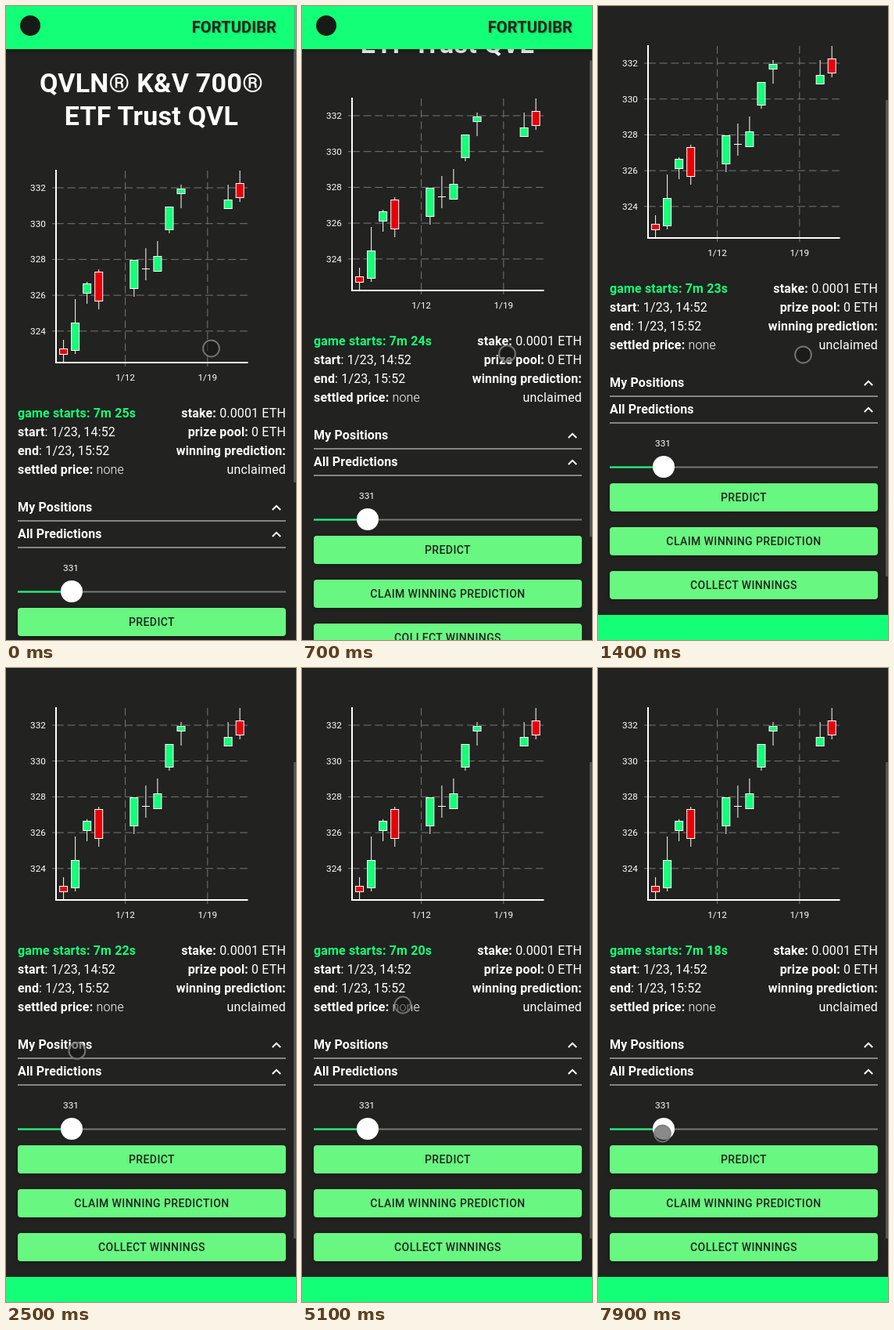
An HTML page that plays this animation: 371 by 809 pixels, repeating every 8000 ms.

```html
<!DOCTYPE html>
<html lang="en">
<head>
<meta charset="utf-8">
<title>Prediction game</title>
<style>
  html, body { margin: 0; width: 100%; height: 100%; overflow: hidden; background: #222220; }
  svg { display: block; width: 371px; height: 809px; font-family: Roboto, sans-serif; fill: #fff; }
  .info { font-size: 16px; letter-spacing: .15px; white-space: pre; }
  .b { font-weight: 700; }
  .light { font-weight: 300; }
  .end { text-anchor: end; }
  .mid { text-anchor: middle; }
  .title { font-size: 34px; font-weight: 700; letter-spacing: .25px; }
  .small { font-size: 11.8px; }
  .green { fill: #14ff78; }
  .button { fill: #68f781; filter: drop-shadow(0 1px 2px rgba(0, 0, 0, .35)); }
  .button-text { font-size: 14px; font-weight: 500; letter-spacing: .4px; fill: #20251f; }
  .brand { font-size: 20px; font-weight: 700; letter-spacing: .15px; fill: #21251f;
    text-shadow: 1px 1px 2px rgba(0, 0, 0, .3); }
  .bar { filter: drop-shadow(0 2px 3px rgba(0, 0, 0, .35)); }
  .grid { stroke: #777; stroke-width: 1; }
  .dash { stroke-dasharray: 9.8 4.9; }
  .line { fill: none; stroke: #fff; stroke-width: 2; }
  .candle { stroke: #fff; stroke-width: 1; }
</style>
</head>
<body>
<svg viewBox="0 0 371 809">
  <g id="page"></g>
  <g id="header">
    <rect class="green bar" width="371" height="55"/>
    <circle cx="31" cy="25" r="13" fill="#151b16"/>
    <text class="brand end" x="346" y="27" dy=".33em">FORTUDIBR</text>
  </g>
  <rect id="scrollbar" x="368" width="3" height="608" fill="#888" fill-opacity=".5"/>
  <circle id="pointer" r="10.4" fill="#141414" fill-opacity=".5" stroke="#7c7c7c" stroke-opacity=".9" stroke-width="2"/>
</svg>
<script>
const LOOP = 8000, STEP = 100;
const $ = id => document.getElementById(id);

// Text is placed by its vertical centre.
const text = (x, y, cls, content) => `<text class="${cls}" x="${x}" y="${y}" dy=".33em">${content}</text>`;
const bold = s => `<tspan class="b">${s}</tspan>`;
const line = (x1, y1, x2, y2, cls) => `<path class="${cls}" d="M${x1} ${y1}L${x2} ${y2}"/>`;
const rect = (x, y, w, h, attrs) => `<rect x="${x}" y="${y}" width="${w}" height="${h}" ${attrs}/>`;

function chart() {
  const left = 64, right = 309, top = 209, bottom = 455, dayWidth = 15.04;
  const dayX = day => 73.6 + day * dayWidth;
  let out = '';
  for (let price = 324; price <= 332; price += 2) {
    const y = 232 + (332 - price) * 22.85;
    out += line(left, y, right, y, 'grid dash') + line(left, y, left - 5, y, 'grid')
      + text(51, y, 'small end', price);
  }
  for (const date of [12, 19]) {
    const x = dayX(date - 6.75);
    out += line(x, bottom, x, top, 'grid dash') + line(x, bottom, x, bottom + 5, 'grid')
      + text(x, 474, 'small mid', '1/' + date);
  }
  out += `<path class="line" d="M${left} ${top}V${bottom}H${right + .5}"/>`;

  // Heights on the stage: open, close, high, low.
  const sessions = [
    [437, 444, 426, 455], [439, 404, 374, 444], [366, 354, 352, 380], [339, 376, 336, 387],
    [360, 324, 324, 371], [335, 335, 309, 350], [338, 319, 300, 339], [285, 256, 256, 290],
    [239, 233, 228, 258], [258, 247, 228, 259], [226, 244, 210, 250]
  ];
  const holiday = 13, weekend = day => day % 7 === 4 || day % 7 === 5;
  const tradingDays = [...Array(16).keys()].filter(day => !weekend(day) && day !== holiday);
  sessions.forEach(([open, close, high, low], i) => {
    const x = dayX(tradingDays[i]), fill = close > open ? '#e60009' : '#14ff78';
    out += line(x, high, x, low, 'candle')
      + rect(x - 5, Math.min(open, close) + .5, 10, Math.abs(close - open), `class="candle" fill="${fill}"`);
    if (open === close) out += line(x - 5, open + .5, x + 5, open + .5, 'candle');
  });
  return out;
}

function details() {
  const lefts = [
    bold('start') + ': 1/23, 14:52',
    bold('end') + ': 1/23, 15:52',
    bold('settled price:') + ' <tspan class="light">none</tspan>'
  ];
  const rights = [
    bold('stake:') + ' 0.0001 ETH',
    bold('prize pool:') + ' 0 ETH',
    bold('winning prediction:'),
    'unclaimed'
  ];
  return '<g id="timer"></g>'
    + lefts.map((s, i) => text(15, 544 + 24 * i, 'info', s)).join('')
    + rights.map((s, i) => text(358, 520 + 24 * i, 'info end', s)).join('');
}

const section = (y, label) => text(15, y, 'info b', label)
  + `<path class="line" d="M340.8 ${y + 3}l5.2 -5.2 5.2 5.2"/>`
  + rect(15, y + 16, 343, 2, 'fill="#858585"');

const slider = () => text(83, 717, 'small mid', '331')
  + rect(15, 746.5, 343, 2, 'fill="#777"') + rect(15, 746.5, 69, 2, 'class="green"')
  + '<circle cx="84" cy="747" r="14"/>';

const button = (label, i) => rect(15, 768 + 56 * i, 343, 36, 'rx="4" class="button"')
  + text(186.5, 786 + 56 * i, 'button-text mid', label);

$('page').innerHTML =
  text(186, 99, 'title mid', 'QVLN® K&amp;V 700®') + text(186, 141, 'title mid', 'ETF Trust QVL')
  + chart() + details()
  + section(640, 'My Positions') + section(674, 'All Predictions') + slider()
  + ['PREDICT', 'CLAIM WINNING PREDICTION', 'COLLECT WINNINGS'].map(button).join('')
  + rect(0, 936, 371, 150, 'class="green"');

// Pointer strokes: start, end, then the point reached.
const strokes = [
  [200, 800, 262.5, 445], [1400, 1500, 252, 451], [1600, 2100, 102, 470], [2200, 2900, 76, 513],
  [3100, 3300, 41, 465], [3400, 3700, 58, 434], [3700, 3900, 102, 430], [4000, 4400, 129, 430],
  [5500, 5700, 122, 476], [6700, 6900, 102, 536], [7000, 7400, 82.5, 594]
];
const ticks = [400, 900, 2400, 3800, 4700, 6800, 6800];

function pointerAt(t) {
  let x = 262.5, y = 437;
  for (const [start, end, toX, toY] of strokes) {
    const p = Math.min(1, Math.max(0, (t - start) / (end - start)));
    x += (toX - x) * p;
    y += (toY - y) * p;
  }
  return [x, y];
}

// The swipe gathers speed, then snaps to the end of the page.
const scrollAt = t => t < 900 ? Math.round(117 * (Math.max(0, t - 200) / 600) ** 1.316) : 159;

function draw() {
  const t = Math.floor(performance.now() % LOOP / STEP) * STEP;
  const scroll = scrollAt(t);
  const headerY = t < 900 ? 0 : t < 1100 ? -12 : -70;
  const seconds = 25 - ticks.filter(time => time <= t).length;
  const move = (id, x, y) => $(id).setAttribute('transform', `translate(${x} ${y})`);

  move('page', 0, -scroll);
  move('header', 0, headerY);
  move('scrollbar', 0, scroll * .755);
  move('pointer', ...pointerAt(t));
  $('timer').innerHTML = text(15, 520, 'info b green', `game starts: 7m ${seconds}s`);
  requestAnimationFrame(draw);
}
draw();
</script>
</body>
</html>
```
